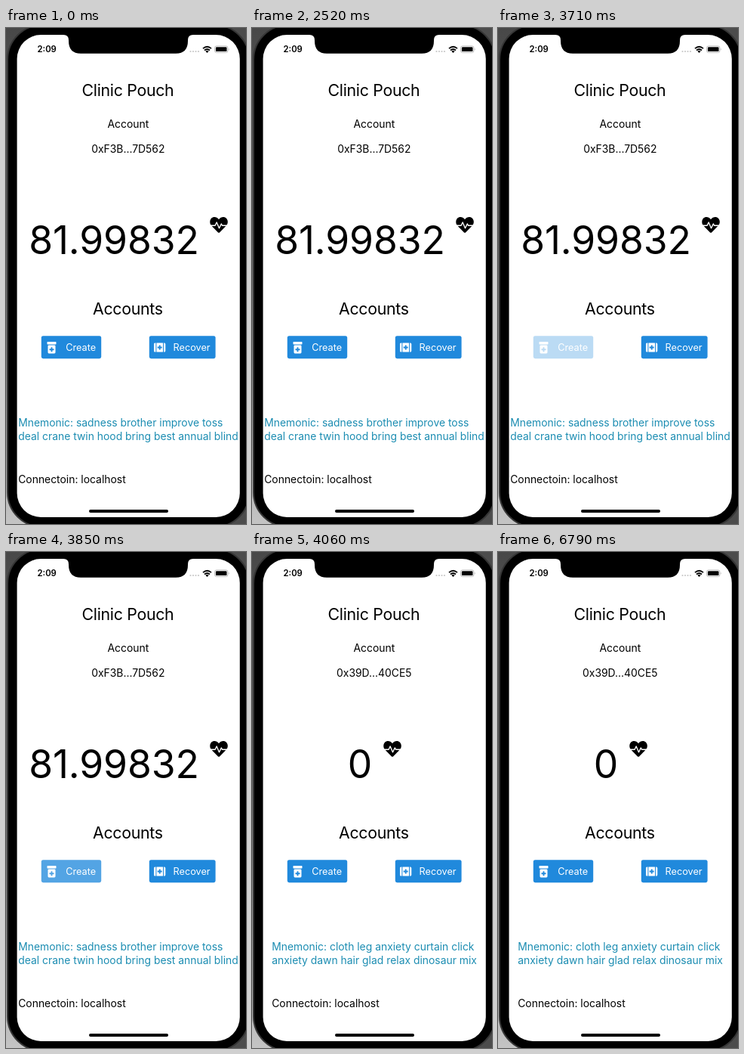
Animation of 318 by 656 pixels, one loop 6860 ms. Source, as an HTML page:

```html
<!DOCTYPE html>
<html lang="en">
<head>
<meta charset="utf-8">
<title>Wallet</title>
<style>
  html, body { margin: 0; width: 100%; height: 100%; overflow: hidden; background: #444; }
  svg { display: block; width: 100vw; height: 100vh; }
  text { font-family: Inter, "Liberation Sans", sans-serif; font-size: 13.9px; white-space: pre; }
  .mid { text-anchor: middle; }
  .head { font-size: 21.3px; letter-spacing: -0.3px; }
  .amount { font-size: 51.5px; letter-spacing: -0.1px; }
  .label { font-size: 12.7px; fill: #fff; }
  .words { fill: #1c8db2; }
  .clock { font-size: 11.3px; font-weight: 600; }
</style>
</head>
<body>
<svg viewBox="0 0 318 656" preserveAspectRatio="none">
  <defs>
    <linearGradient id="desk" x1="0" y1="0" x2="0" y2="1">
      <stop offset="0" stop-color="#484848"/>
      <stop offset=".4" stop-color="#666"/>
      <stop offset="1" stop-color="#c4c4c4"/>
    </linearGradient>
  </defs>

  <!-- Phone -->
  <rect width="318" height="656" fill="#4c4c4c"/>
  <rect width="160" height="656" fill="url(#desk)"/>
  <rect x="2" y="-4" width="320.5" height="664" rx="46" stroke="#363636" stroke-width="2"/>
  <path fill="#fff" d="M46 9H76Q83 9 83 16V17Q83 33.7 99 33.7H225Q241 33.7 241 17V16Q241 9 248 9H278
    A31.8 31.8 0 0 1 309.8 40.8V615.2A31.8 31.8 0 0 1 278 647H46.4
    A31.8 31.8 0 0 1 14.6 615.2V40.8A31.8 31.8 0 0 1 46.4 9Z"/>
  <rect x="110" y="637" width="105" height="4" rx="2"/>

  <!-- Status bar -->
  <text class="clock" x="41.5" y="32.3">2:09</text>
  <g fill="#c8c8c8">
    <circle cx="244.5" cy="31" r="1.1"/><circle cx="248" cy="31" r="1.1"/>
    <circle cx="251.5" cy="31" r="1.1"/><circle cx="255" cy="31" r="1.1"/>
  </g>
  <g fill="none" stroke="#000" stroke-width="1.8">
    <path d="M261 27.2Q266.5 22.2 272 27.2M263 29.5Q266.5 26.4 270 29.5"/>
    <path fill="#000" stroke="none" d="M264.4 30.7Q266.5 29 268.6 30.7L266.5 33Z"/>
  </g>
  <rect x="276.5" y="23.9" width="17.4" height="8.6" rx="2.4" fill="none" stroke="#b4b4b4" stroke-width=".9"/>
  <rect x="277.9" y="25.3" width="14.6" height="5.8" rx="1.2"/>
  <path d="M295 26.8Q296.6 28.2 295 29.6Z" fill="#b4b4b4"/>

  <!-- Account -->
  <text class="mid head" x="161.5" y="89.5">Clinic Pouch</text>
  <text class="mid" x="161.8" y="132">Account</text>
  <text class="mid" id="address" x="161.8" y="165"></text>
  <text class="mid amount" id="amount" x="143" y="299.2"></text>
  <g id="heart">
    <path d="M282 253.3C284.7 249.4 289.5 249.2 292 251.8C294.4 254.5 294.4 258.5 292 261.2
      L283 270.4Q282 271.3 281 270.4L272 261.2C269.7 258.5 269.7 254.5 272 251.8
      C274.6 249.2 279.3 249.4 282 253.3Z"/>
    <path d="M270 261.2H277.1L279.1 257L282.5 264.8L285.3 259L286.5 261.2H294"
      fill="none" stroke="#fff" stroke-width="1.4" stroke-linejoin="round"/>
  </g>
  <text class="mid head" x="161.4" y="378.8">Accounts</text>

  <!-- Buttons -->
  <g id="create">
    <rect x="46.8" y="407.2" width="79.4" height="30" rx="2.4" fill="#2089dc"/>
    <rect x="54.5" y="415" width="12" height="3.4" rx=".7" fill="#fff"/>
    <rect x="55.5" y="419.4" width="10" height="11" rx="1.4" fill="#fff"/>
    <path d="M60.5 422.2V428.2M57.5 425.2H63.5" stroke="#2089dc" stroke-width="1.9"/>
    <text class="label" x="79.2" y="427.2">Create</text>
  </g>
  <g>
    <rect x="189.8" y="407.2" width="87.8" height="30" rx="2.4" fill="#2089dc"/>
    <path d="M197.6 416.5H198.4V428.5H197.6A1.5 1.5 0 0 1 196 427V418A1.5 1.5 0 0 1 197.6 416.5Z
      M199.4 416.5H208V428.5H199.4ZM209 416.5H209.8A1.5 1.5 0 0 1 211.3 418V427
      A1.5 1.5 0 0 1 209.8 428.5H209Z" fill="#fff"/>
    <path d="M203.7 419.5V425.5M200.7 422.5H206.7" stroke="#2089dc" stroke-width="1.9"/>
    <text class="label" x="221.6" y="427.2">Recover</text>
  </g>

  <!-- Footer -->
  <g id="footer">
    <text class="words" id="line1" y="527"></text>
    <text class="words" id="line2" y="545"></text>
    <text y="602">Connectoin: localhost</text>
  </g>
</svg>
<script>
  const LOOP = 6860, STEP = 70;
  const PRESS = 3710, NEW_WORDS = 3990, NEW_ACCOUNT = 4060;
  const $ = id => document.getElementById(id);

  const accounts = [
    { address: "0xF3B...7D562", amount: "81.99832", heartX: 0 },
    { address: "0x39D...40CE5", amount: "0", heartX: -96 }
  ];
  const phrases = [
    { x: 16.2, lines: ["Mnemonic: sadness brother improve toss", "deal crane twin hood bring best annual blind"] },
    { x: 26.2, lines: ["Mnemonic: cloth leg anxiety curtain click", "anxiety dawn hair glad relax dinosaur mix"] }
  ];

  // The pressed button fades back in.
  function pressOpacity(t) {
    if (t < PRESS) return 1;
    const p = Math.min(1, (t - PRESS) / 280);
    return 0.3 + 0.7 * (1 - (1 - p) ** 1.6);
  }

  function render(t) {
    const account = accounts[+(t >= NEW_ACCOUNT)];
    const phrase = phrases[+(t >= NEW_WORDS)];
    $("address").textContent = account.address;
    $("amount").textContent = account.amount;
    $("heart").setAttribute("transform", `translate(${account.heartX} 0)`);
    $("line1").textContent = phrase.lines[0];
    $("line2").textContent = phrase.lines[1];
    $("footer").setAttribute("transform", `translate(${phrase.x} 0)`);
    $("create").setAttribute("opacity", pressOpacity(t));
  }

  const start = performance.now();
  function frame() {
    const t = (performance.now() - start) % LOOP;
    render(Math.floor(t / STEP) * STEP);
    requestAnimationFrame(frame);
  }
  frame();
</script>
</body>
</html>
```
